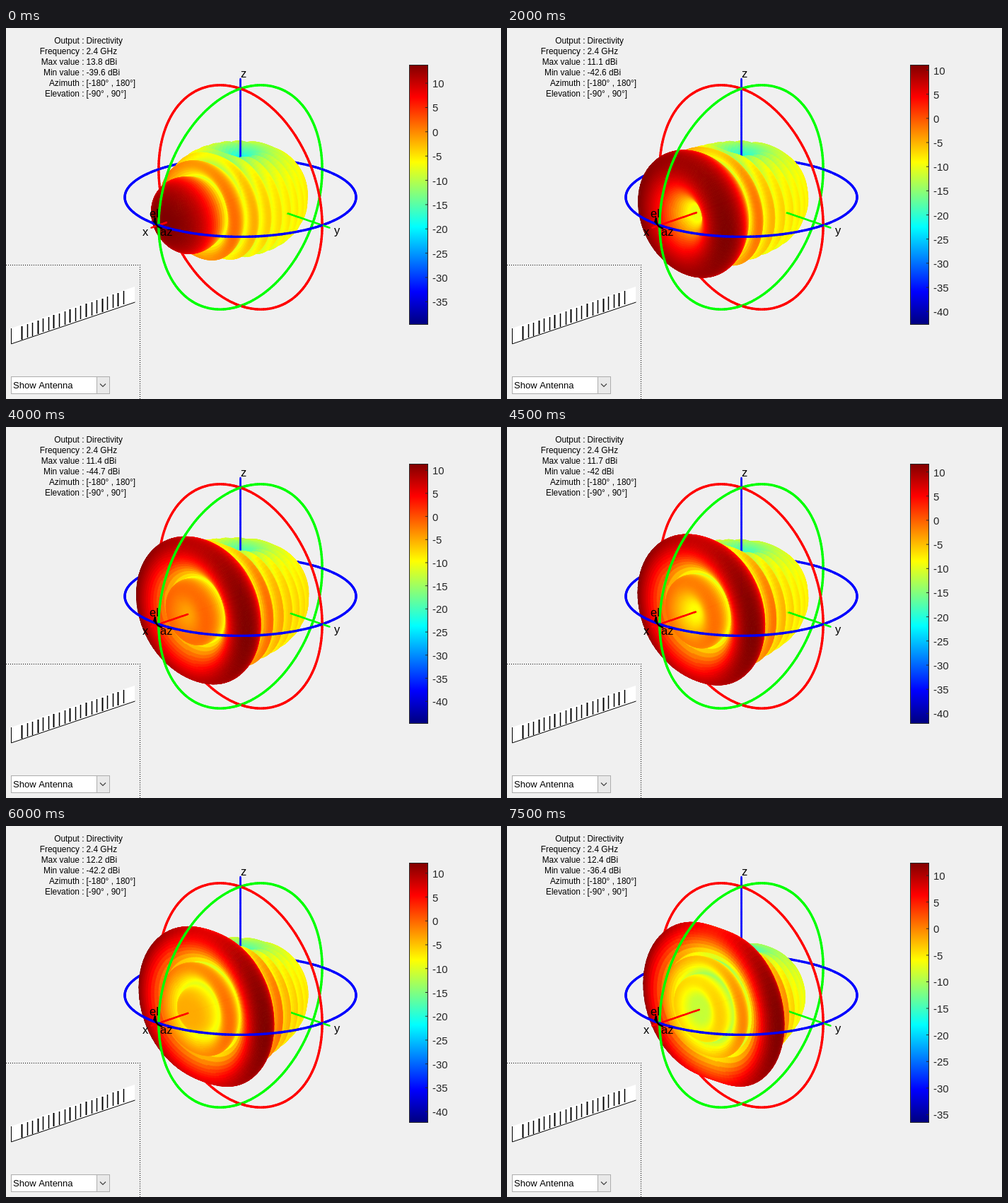
Write an HTML page with a canvas that moves like this. It is 700 px wide and 525 px high and loops after 8 s.

```html
<!DOCTYPE html>
<html>
<head>
<meta charset="utf-8">
<style>
html, body { margin: 0; width: 100%; height: 100%; overflow: hidden; background: #f0f0f0; }
canvas { display: block; }
</style>
</head>
<body>
<canvas id="stage" width="700" height="525"></canvas>
<script>
const ctx = document.getElementById('stage').getContext('2d');
const FONT = 'px "Liberation Sans", Arial, sans-serif';
const LOOP = 8000, STEP = 500;
const CX = 331.5, CY = 239.5, R = 163.5, SURFACE = 0.9 * R, AXIS = 1.09 * R;
const SIN = Math.sin(Math.PI / 9), COS = Math.cos(Math.PI / 9), H = Math.SQRT1_2;
const ELEMENTS = 16, APERTURE = 5.2, FLOOR = 0.008, NULL_DEPTH = 1.028;

// step, max dBi, min dBi
const LEVELS = [
  [0, 13.8, -39.6], [4, 11.1, -42.6], [6, 11.4, -41], [8, 11.4, -44.7],
  [10, 11.9, -39.4], [12, 12.2, -42.2], [15, 12.4, -36.4]
];

function levelsAt(step) {
  const k = Math.max(1, LEVELS.findIndex(p => p[0] >= step));
  const a = LEVELS[k - 1], b = LEVELS[k], f = (step - a[0]) / (b[0] - a[0]);
  return [1, 2].map(j => +(a[j] + (b[j] - a[j]) * f).toFixed(1));
}

// Cosine of the steering angle; above 1 the beam lies along the x axis.
const steering = step => step < 4 ? 1.03 - 0.05625 * step : 0.805 - 0.0355 * (step - 4);

function arrayPower(cosine, steer) {
  const u = Math.PI * APERTURE * (cosine - steer);
  const af = Math.abs(u) < 1e-6 ? 1 : Math.sin(u) / (ELEMENTS * Math.sin(u / ELEMENTS));
  return af * af + FLOOR;
}

function jet(v) {
  const c = k => Math.round(255 * Math.max(0, Math.min(1, 1.5 - Math.abs(4 * v - k))));
  return `rgb(${c(3)},${c(2)},${c(1)})`;
}

// World point to screen x, screen y and depth towards the viewer.
const project = (x, y, z) => [
  CX + H * (y - x),
  CY + SIN * H * (x + y) - COS * z,
  COS * H * (x + y) + SIN * z
];

function addLine(parts, color, width, count, point) {
  for (let i = 0; i < count; i++) {
    const pts = [point(i / count), point((i + 1) / count)];
    parts.push({ pts, color, width, depth: (pts[0][2] + pts[1][2]) / 2 + 1.5 });
  }
}

function addSurface(parts, steer, range) {
  const rows = 200, cols = 90, grid = [];
  const peak = arrayPower(Math.min(1, steer), steer) * NULL_DEPTH;
  for (let i = 0; i <= rows; i++) {
    const theta = Math.PI * i / rows, c = Math.cos(theta), s = Math.sin(theta);
    const power = arrayPower(c, steer), row = [];
    for (let j = 0; j <= cols; j++) {
      const phi = 2 * Math.PI * j / cols;
      const y = s * Math.cos(phi), z = s * Math.sin(phi);
      const db = 10 * Math.log10(power * (NULL_DEPTH - z * z) / peak);
      const v = Math.max(0, Math.min(1, 1 + db / range)), r = SURFACE * v;
      row.push([...project(r * c, r * y, r * z), v]);
    }
    grid.push(row);
  }
  for (let i = 0; i < rows; i++) {
    for (let j = 0; j < cols; j++) {
      const pts = [grid[i][j], grid[i + 1][j], grid[i + 1][j + 1], grid[i][j + 1]];
      const mean = k => pts.reduce((sum, p) => sum + p[k], 0) / 4;
      parts.push({ pts, color: jet(mean(3)), depth: mean(2) });
    }
  }
}

function drawPattern(step, range) {
  const parts = [];
  const circle = (color, place) => addLine(parts, color, 3.4, 240, f =>
    project(...place(R * Math.cos(2 * Math.PI * f), R * Math.sin(2 * Math.PI * f))));
  const axis = (color, x, y, z) => addLine(parts, color, 2.4, 90, f =>
    project(x * f * AXIS, y * f * AXIS, z * f * AXIS));
  addSurface(parts, steering(step), range);
  circle('#00f', (a, b) => [a, b, 0]);
  circle('#f00', (a, b) => [0, a, b]);
  circle('#0f0', (a, b) => [a, 0, b]);
  axis('#f00', 1, 0, 0);
  axis('#0f0', 0, 1, 0);
  axis('#00f', 0, 0, 1);
  parts.sort((a, b) => a.depth - b.depth);

  ctx.lineCap = ctx.lineJoin = 'round';
  for (const { pts, color, width } of parts) {
    ctx.beginPath();
    pts.forEach(p => ctx.lineTo(p[0], p[1]));
    ctx.strokeStyle = ctx.fillStyle = color;
    ctx.lineWidth = width || 0.8;
    if (!width) {
      ctx.closePath();
      ctx.fill();
    }
    ctx.stroke();
  }
  ctx.lineCap = 'butt';
  ctx.lineJoin = 'miter';
}

function text(s, x, y, size, align = 'left', color = '#000') {
  ctx.font = size + FONT;
  ctx.textAlign = align;
  ctx.fillStyle = color;
  ctx.fillText(s, x, y);
}

function path(points, width, color = '#000') {
  ctx.beginPath();
  points.forEach(p => ctx.lineTo(...p));
  ctx.lineWidth = width;
  ctx.strokeStyle = color;
  ctx.stroke();
}

function box(x, y, w, h, fill, stroke) {
  ctx.fillStyle = fill;
  ctx.fillRect(x, y, w, h);
  ctx.strokeStyle = stroke;
  ctx.lineWidth = 1;
  ctx.strokeRect(x + 0.5, y + 0.5, w - 1, h - 1);
}

function drawLabels() {
  text('z', 336, 70, 16.5, 'center');
  text('y', 468, 292, 16.5, 'center');
  text('x', 197, 294, 16.5, 'center');
  text('el', 203, 268, 16.5);
  text('az', 218, 294, 16.5);
  path([[211, 269], [211, 276], [215, 281], [221, 284]], 2.4);
  ctx.fillStyle = '#000';
  ctx.beginPath();
  [[210.5, 266], [213.5, 277], [208, 275]].forEach(p => ctx.lineTo(...p));
  ctx.fill();
}

function drawInfo(max, min) {
  [
    ['Output', 'Directivity'], ['Frequency', '2.4 GHz'],
    ['Max value', max + ' dBi'], ['Min value', min + ' dBi'],
    ['Azimuth', '[-180° , 180°]'], ['Elevation', '[-90° , 90°]']
  ].forEach(([name, value], i) => {
    text(name + ' :', 110.5, 22 + 15 * i, 11.9, 'right');
    text(value, 113.5, 22 + 15 * i, 11.9);
  });
}

function drawColorbar(max, min) {
  const top = 52, height = 367;
  const fill = ctx.createLinearGradient(0, top + height, 0, top);
  for (let i = 0; i <= 8; i++) fill.addColorStop(i / 8, jet(i / 8));
  box(570, top, 27, height + 1, fill, '#262626');
  for (let v = Math.ceil(min / 5) * 5; v <= max; v += 5) {
    const y = top + (max - v) / (max - min) * height;
    path([[593, y], [597, y]], 1, '#262626');
    text(v, 603, y + 6, 15, 'left', '#262626');
  }
}

function drawInset() {
  ctx.fillStyle = '#000';
  for (let x = 0; x < 190; x += 3) ctx.fillRect(x, 335, 1, 1);
  for (let y = 335; y < 525; y += 3) ctx.fillRect(189, y, 1, 1);

  ctx.fillStyle = '#fff';
  ctx.beginPath();
  [[7, 425], [182, 366], [182, 388], [7, 447]].forEach(p => ctx.lineTo(...p));
  ctx.fill();
  path([[7.5, 425], [7.5, 447], [182.5, 388]], 1);
  for (let i = 0; i < 20; i++) {
    const x = Math.round(22 + 7.58 * i), y = Math.round(422 - 2.63 * i);
    path([[x + 0.5, y], [x + 0.5, y + 19]], i % 3 ? 1.5 : 2);
  }

  box(7, 493, 140, 25, '#fff', '#adadad');
  box(128, 493, 19, 25, '#e9e9e9', '#adadad');
  text('Show Antenna', 10, 510, 13);
  path([[133, 503.5], [137, 507.5], [141, 503.5]], 1.2, '#444');
}

function draw(step) {
  const [max, min] = levelsAt(step);
  ctx.fillStyle = '#f0f0f0';
  ctx.fillRect(0, 0, 700, 525);
  drawInfo(max, min);
  drawColorbar(max, min);
  drawInset();
  drawPattern(step, max - min);
  drawLabels();
}

let shown = -1;
const start = performance.now();
function tick() {
  const step = Math.floor((performance.now() - start) % LOOP / STEP);
  if (step !== shown) draw(shown = step);
  requestAnimationFrame(tick);
}
tick();
</script>
</body>
</html>
```
